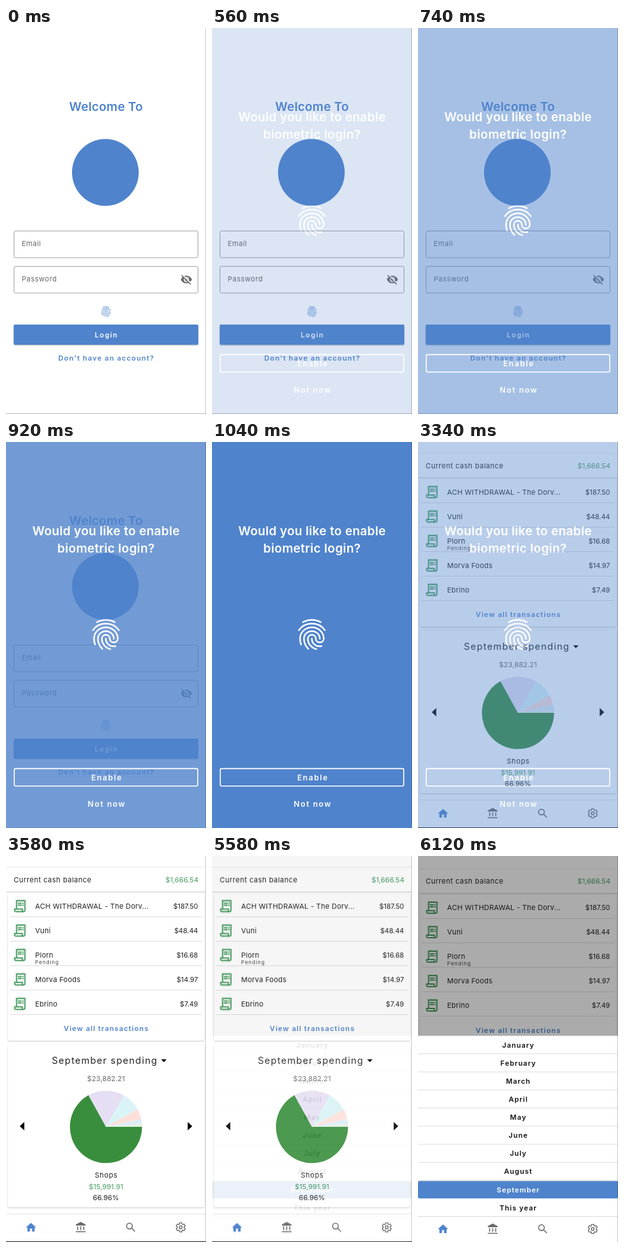
An HTML page that plays this animation: 312 by 600 pixels, repeating every 8 s.

```html
<!DOCTYPE html>
<html lang="en">
<head>
<meta charset="utf-8">
<title>Budget app walkthrough</title>
<style>
html, body { margin: 0; width: 100%; height: 100%; overflow: hidden; background: #fff; }
svg { display: block; }
text { font-family: Inter, "Open Sans", sans-serif; white-space: pre; }
.card { fill: #fff; filter: drop-shadow(0 1px 1px rgba(0, 0, 0, .22)); }
</style>
</head>
<body>
<svg id="stage" width="312" height="600" viewBox="0 0 312 600"></svg>
<script>
const BLUE = '#4f83cc', GREEN = '#4a9d62', GREY = '#6b6b6b', INK = '#222';
const LOOP = 8000, STEP = 60, STEPS = 10, FADES = [500, 3040, 5580];

// Trailing letter spacing is cancelled so that anchors stay optical.
function text(str, x, y, { size = 11, weight = 400, gap = 0, fill = INK, anchor = 'middle' } = {}) {
  const shift = { start: 0, middle: gap / 2, end: gap }[anchor];
  return `<text x="${x + shift}" y="${y}" font-size="${size}" font-weight="${weight}"
    letter-spacing="${gap}" fill="${fill}" text-anchor="${anchor}">${str}</text>`;
}
const rect = (x, y, w, h, attrs) => `<rect x="${x}" y="${y}" width="${w}" height="${h}" ${attrs}/>`;
const line = (x1, x2, y, color) => `<path d="M${x1} ${y}H${x2}" stroke="${color}"/>`;
const path = (d, fill) => `<path d="${d}" fill="${fill}"/>`;
const stroke = (d, color, width) =>
  `<path d="${d}" fill="none" stroke="${color}" stroke-width="${width}" stroke-linecap="round"/>`;
const at = (x, y, scale, body) => `<g transform="translate(${x} ${y}) scale(${scale})">${body}</g>`;
const page = fill => rect(0, 0, 312, 600, `fill="${fill}"`);
const polar = (r, deg) => {
  const a = deg * Math.PI / 180;
  return `${(r * Math.cos(a)).toFixed(2)} ${(r * Math.sin(a)).toFixed(2)}`;
};

// Icons on a 24 unit grid
const fingerprint = color => stroke(`M6.2 4C8 3 9.9 2.5 12 2.5S16 3 17.8 4
  M3.5 9.2C5.5 6.4 8.6 4.9 12 4.9s6.5 1.5 8.5 4.3
  M9.7 21.3C8.2 19.8 6.84 17.6 6.84 14.7 6.84 12 9.15 9.8 12 9.8s5.16 2.2 5.16 4.9
  M14.9 21.5C11.6 20.6 9.4 18 9.4 14.7 9.4 13.3 10.5 12.2 12 12.2s2.58 1.1 2.58 2.5 1.15 2.4 2.58 2.4
  2.58-1.1 2.58-2.4C19.74 10.6 16.2 7.3 12 7.3 9 7.3 6.2 9 4.9 11.6 4 13.8 4.1 16.2 5 18.5
  M12 14.7c0 3 2.3 4.9 5 4.9q.7 0 1.3-.1`, color, 1);

const hiddenEye = path('M1 12C2.7 7.6 7 4.5 12 4.5S21.3 7.6 23 12C21.3 16.4 17 19.5 12 19.5S2.7 16.4 1 12', GREY)
  + '<circle cx="12" cy="12" r="5" fill="#fff"/>' + `<circle cx="12" cy="12" r="3" fill="${GREY}"/>`
  + stroke('M4 2.2L22 20.2', '#fff', 2) + stroke('M2.8 3.8L20.2 21.2', GREY, 1.8);

const receipt = path(`M19.5 3.5L18 2l-1.5 1.5L15 2l-1.5 1.5L12 2l-1.5 1.5L9 2 7.5 3.5 6 2v14H3v3
  c0 1.66 1.34 3 3 3h12c1.66 0 3-1.34 3-3V2zM15 20H6c-.55 0-1-.45-1-1v-1h10zm4-1a1 1 0 0 1-2 0v-3H8V5h11z
  M9 7h6v2H9zM16 7h2v2h-2zM9 10h6v2H9zM16 10h2v2h-2z`, GREEN);

const home = path('M10 20v-6h4v6h5v-8h3L12 3 2 12h3v8z', BLUE);
const bank = path(`M4.5 10h2v7h-2zM10.5 10h2v7h-2zM16.5 10h2v7h-2zM2 19h19v2H2z
  M11.5 1L2 6v2h19V6zM11.5 3.26L6.3 6H16.7z`, GREY);
const search = stroke('M15 9.5a5.5 5.5 0 1 0-11 0a5.5 5.5 0 1 0 11 0M14 14l5.5 5.5', GREY, 2);

function gear() {
  const points = [];
  for (let k = 0; k < 6; k++) {
    const a = 60 * k - 90;
    points.push(polar(6.8, a - 23), polar(9.2, a - 14), polar(9.2, a + 14), polar(6.8, a + 23));
  }
  return at(12, 12, 1, `<path d="M${points.join('L')}Z" fill="none" stroke="${GREY}"
    stroke-width="1.7" stroke-linejoin="round"/><circle r="2.7" fill="none" stroke="${GREY}" stroke-width="1.7"/>`);
}

function login() {
  const field = (label, y) => rect(12.5, y, 287, 41.5, 'rx="2.5" fill="none" stroke="#a3a3a3"')
    + text(label, 24.5, y + 23.5, { gap: .5, fill: '#666', anchor: 'start' });
  return page('#fff')
    + text('Welcome To', 156, 129, { size: 19, weight: 600, gap: .2, fill: BLUE })
    + `<circle cx="155" cy="224.5" r="52" fill="${BLUE}"/>`
    + field('Email', 315.5) + field('Password', 370.5)
    + at(272, 381.6, .78, hiddenEye) + at(146, 431, .83, fingerprint(BLUE))
    + rect(12, 461, 288, 31.5, `rx="2" class="card" style="fill:${BLUE}"`)
    + text('Login', 156, 481, { weight: 600, gap: 1.4, fill: '#fff' })
    + text("Don't have an account?", 156, 517, { weight: 600, gap: 1.15, fill: BLUE })
    + line(0, 312, 599.5, '#bbb');
}

function biometric() {
  const title = { size: 19, weight: 600, gap: .3, fill: '#fff' };
  const button = { size: 12, weight: 600, gap: 1.6, fill: '#fff' };
  return page(BLUE)
    + text('Would you like to enable', 156, 145, title) + text('biometric login?', 156, 172, title)
    + at(127, 270.5, 2.4, fingerprint('#fff'))
    + rect(12.8, 507.6, 286.4, 27.2, 'rx="2.5" fill="none" stroke="#fff" stroke-width="1.6"')
    + text('Enable', 156.5, 526, button) + text('Not now', 156.5, 566.5, button);
}

function pie() {
  const slices = [[241, '#388e3c'], [300, '#e6dff3'], [331, '#d9f3f7'],
    [347.5, '#fde0da'], [355, '#dcecf7'], [360, '#e3efe4']];
  let from = 0;
  return at(156, 421, 1, slices.map(([to, color]) => {
    const d = `M0 0L${polar(56.3, from)}A56.3 56.3 0 ${+(to - from > 180)} 1 ${polar(56.3, to)}Z`;
    from = to;
    return path(d, color);
  }).join(''));
}

function overview() {
  const rows = [['ACH WITHDRAWAL - The Dorv...', '$187.50'], ['Vuni', '$48.44'],
    ['Plorn', '$16.68'], ['Morva Foods', '$14.97'], ['Ebrino', '$7.49']];
  const list = rows.map(([name, amount], i) => {
    const y = 38 * i;
    return at(9.5, 65.5 + y, 1, receipt)
      + text(name, 45.5, 81.5 + y, { gap: .25, anchor: 'start' })
      + text(amount, 299.5, 81.5 + y, { size: 10.7, anchor: 'end' })
      + line(6, 306, 94.5 + y, '#ddd');
  }).join('');
  return rect(0, 17, 312, 38, 'class="card"') + line(0, 312, 17.5, '#f0f0f0')
    + text('Current cash balance', 12, 40.5, { gap: .5, anchor: 'start' })
    + text('$1,666.54', 300, 40.5, { fill: GREEN, anchor: 'end' })
    + rect(3, 58, 306, 229, 'rx="2" class="card"') + list
    + text('Pending', 45.5, 167.5, { size: 8, gap: .9, fill: '#444', anchor: 'start' })
    + text('View all transactions', 156, 272, { weight: 600, gap: 1.08, fill: BLUE })
    + rect(3, 293, 306, 253, 'rx="2" class="card"')
    + text('September spending', 153.5, 323, { size: 14.5, gap: 1.25 })
    + path('M242 316h8.5l-4.25 4.5z', '#000')
    + text('$23,882.21', 156, 350, { gap: .1, fill: GREY })
    + pie()
    + path('M28.5 413.5v13l-7-6.5zM283.5 413.5v13l7-6.5z', '#000')
    + text('Shops', 156, 500, { gap: .6 })
    + text('$15,991.91', 156, 517.5, { fill: GREEN })
    + text('66.96%', 156, 534.5);
}

const nav = () => rect(0, 556, 312, 44, 'fill="#fff"')
  + at(29.4, 567.8, .8, home) + at(107.3, 568, .8, bank)
  + at(185, 567.6, .8, search) + at(263, 567.6, .8, gear());

const dashboard = () => page('#fff') + overview() + nav()
  + line(0, 312, 556.5, '#e4e4e4') + line(0, 312, 599.5, '#222');

function picker() {
  const items = ['January', 'February', 'March', 'April', 'May', 'June', 'July',
    'August', 'September', 'This year'];
  const list = items.map((name, i) => {
    const y = 279.5 + 28.1 * i, chosen = name === 'September';
    return (chosen ? rect(0, y + 1, 312, 27, `rx="2" fill="${BLUE}"`) : line(0, 312, y + 28.1, '#ddd'))
      + text(name, 156, y + 18.2, { weight: 600, gap: 1, fill: chosen ? '#fff' : '#111' });
  }).join('');
  return page('#fff') + at(0, 2.5, 1, overview())
    + rect(0, 0, 312, 600, 'fill="#000" opacity=".33"')
    + rect(0, 279.5, 312, 320.5, 'fill="#fff"')
    + at(0, 2.5, 1, nav()) + list;
}

const stage = document.getElementById('stage');
stage.innerHTML = [login, biometric, dashboard, picker].map(draw => `<g>${draw()}</g>`).join('')
  + rect(311, 0, 1, 600, 'fill="#000" opacity=".22"');

// Each screen fades in over the one before it, in ten even steps.
function frame(now) {
  const t = now % LOOP;
  FADES.forEach((start, i) => {
    const step = Math.floor((t - start) / STEP) + 1;
    stage.children[i + 1].setAttribute('opacity', Math.max(0, Math.min(STEPS, step)) / STEPS);
  });
}
const begin = performance.now();
function tick() {
  frame(performance.now() - begin);
  requestAnimationFrame(tick);
}
tick();
</script>
</body>
</html>
```
